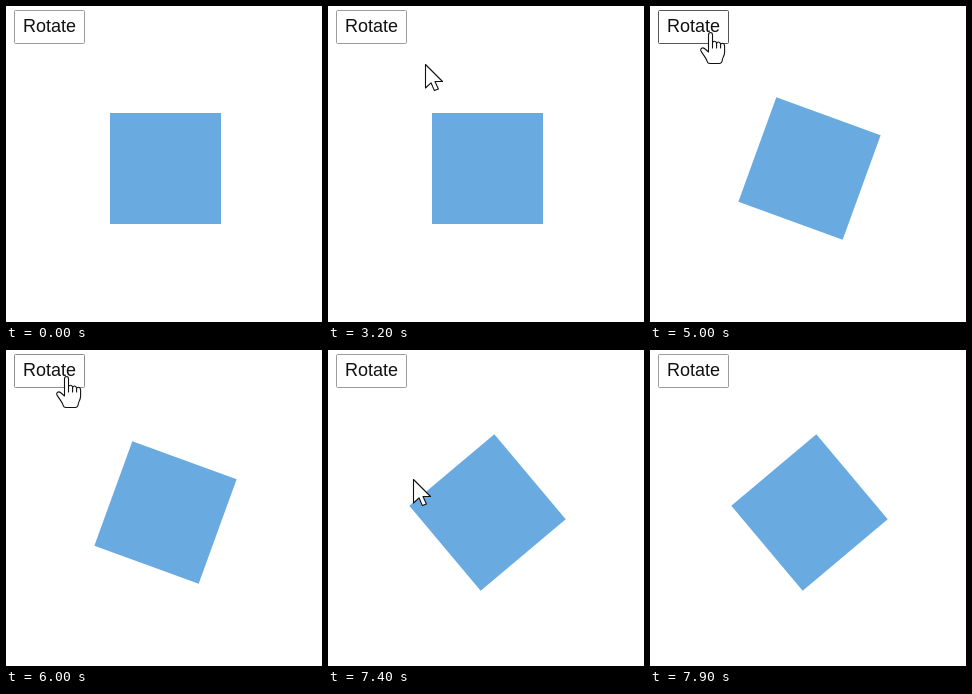
Recreate the animation shown at these times as an HTML page. Size 316 by 316 pixels, loop 8700 ms.

```html
<!DOCTYPE html>
<html lang="en">
<head>
<meta charset="utf-8">
<title>Rotate</title>
<style>
html, body { margin: 0; width: 100%; height: 100%; overflow: hidden; background: #fff; }
svg { display: block; width: 100vw; height: 100vh; }
text { font: 18px "Liberation Sans", Arial, sans-serif; fill: #111; }
.cursor { fill: #fff; stroke: #111; stroke-width: 1.1; stroke-linejoin: round; stroke-linecap: round; }
.box, .arrow, .hand, .button { animation: 8700ms step-end infinite; }
.box { transform-origin: 159.5px 162.5px; animation-name: turn; }
.button { fill: #fff; stroke: #9c9c9c; animation-name: hover; }
.arrow { animation-name: arrow; }
.hand { animation-name: hand; }

@keyframes turn {
  0% { transform: rotate(0deg); }
  57.47% { transform: rotate(20deg); }
  71.26% { transform: rotate(50deg); }
}
@keyframes hover {
  0% { stroke: #9c9c9c; }
  39.08% { stroke: #565656; }
  67.81% { stroke: #8d8d8d; }
  71.26% { stroke: #565a64; }
  85.05% { stroke: #9c9c9c; }
}
@keyframes arrow {
  0% { transform: translate(-60px, 0); }
  31.03% { transform: translate(175px, 140px); }
  32.18% { transform: translate(128px, 92px); }
  33.33% { transform: translate(106px, 68px); }
  36.78% { transform: translate(97px, 58px); }
  37.93% { transform: translate(82px, 43px); }
  39.08% { transform: translate(-60px, 0); }
  85.05% { transform: translate(85px, 129px); }
  86.2% { transform: translate(88px, 190px); }
  87.35% { transform: translate(87px, 236px); }
  88.5% { transform: translate(85px, 272px); }
  89.65% { transform: translate(82px, 302px); }
  90.8% { transform: translate(-60px, 0); }
}
@keyframes hand {
  0% { transform: translate(-120px, 0); }
  39.08% { transform: translate(5px, 4px); }
  40.22% { transform: translate(0, 0); }
  85.05% { transform: translate(-120px, 0); }
}
</style>
</head>
<body>
<svg viewBox="0 0 316 316">
  <rect class="button" x="8.5" y="4.5" width="70" height="33" rx="1"/>
  <text x="17" y="26">Rotate</text>
  <rect class="box" x="104" y="107" width="111" height="111" fill="#69aae1"/>
  <path class="cursor arrow" d="M.5 .5V24L6 18.8L9.4 26.6L13.4 24.9L10 17.5H17.5Z"/>
  <g class="cursor hand">
    <path d="M58.5 46V29Q58.5 26.5 60.5 26.5T62.5 29V37Q62.8 35.3 64.6 35.3T66.6 37.5Q67 36 68.6 36T70.6 38.4Q71 37.2 72.6 37.2T74.6 39.8V46C74.6 50 72.5 51.5 72.3 54Q72 57.5 69 57.5H60Q57.5 57.5 57 55C56.5 52.5 52.5 48 51 45C50 42.5 52.5 41 54.5 42.5Z"/>
    <path d="M62.5 37V42M66.6 37.5V42M70.6 38.4V42" fill="none"/>
  </g>
</svg>
</body>
</html>
```
